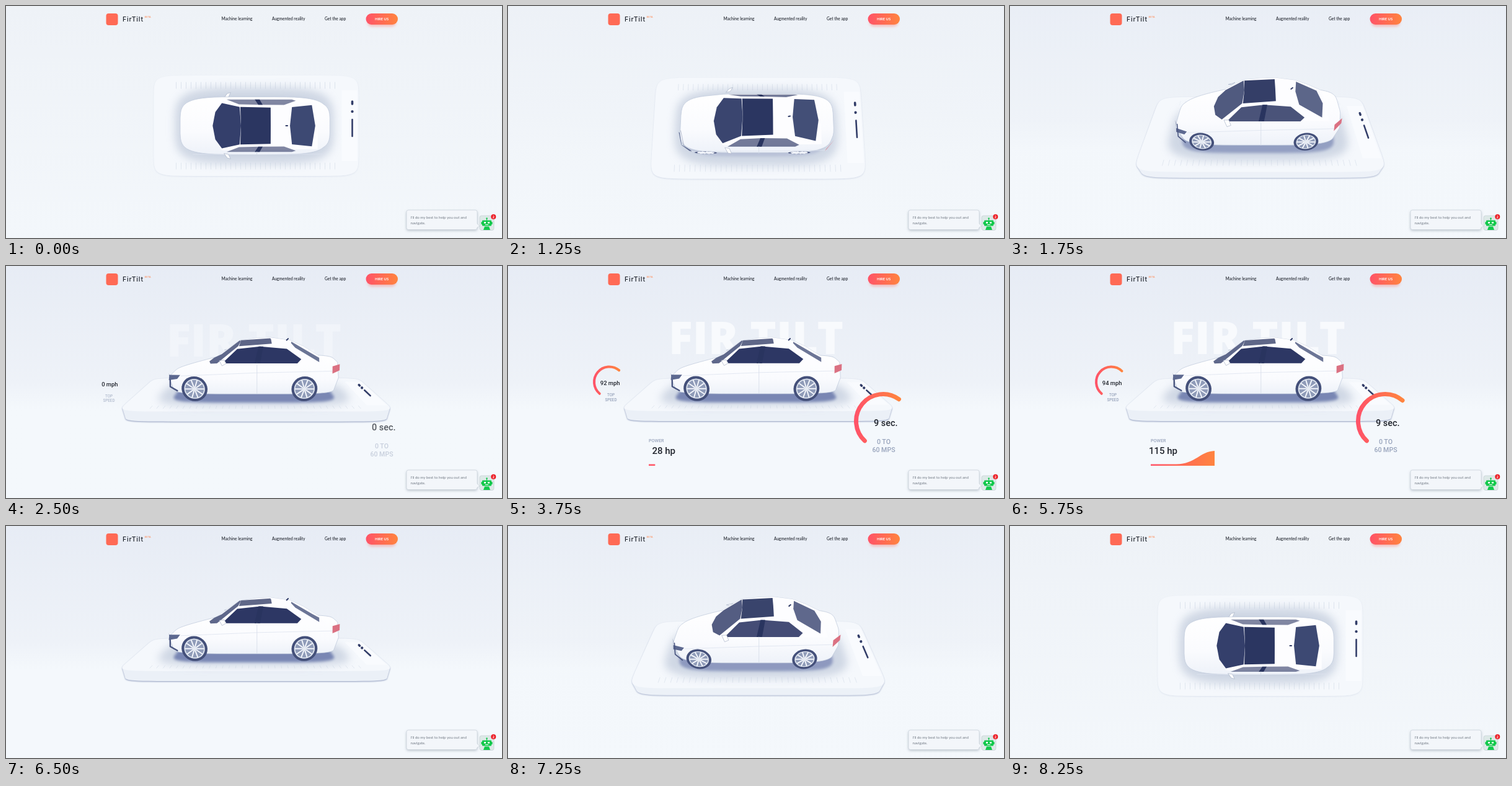
Recreate the animation shown at these times as an HTML page. Size 800 px wide and 374 px high, loop 8500 ms.

```html
<!DOCTYPE html>
<html lang="en">
<head>
<meta charset="utf-8">
<title>FirTilt</title>
<style>
  html, body { margin: 0; height: 100%; overflow: hidden; background: #f2f6fa; }
  svg { display: block; width: 100vw; height: 100vh; }
  text { font-family: Lato, sans-serif; fill: #1c2029; }
  .nav { font-size: 6.6px; font-weight: 500; }
  .chat { font-size: 6.1px; fill: #737b86; }
  .num { font-family: Roboto, sans-serif; font-weight: 500; fill: #20242c; }
  .label { font-family: Roboto, sans-serif; fill: #98a4bc; font-weight: 500; }
  .mid { text-anchor: middle; }
  .end { text-anchor: end; }
</style>
</head>
<body>
<svg viewBox="0 0 800 374">
  <defs>
    <linearGradient id="sky" x2="0" y2="1">
      <stop stop-color="#e7ecf5"/><stop offset=".5" stop-color="#eef2f8"/><stop offset=".62" stop-color="#f4f8fc"/>
    </linearGradient>
    <linearGradient id="floor" x2="0" y2="1">
      <stop stop-color="#eef2f7"/><stop offset="1" stop-color="#f3f7fb"/>
    </linearGradient>
    <linearGradient id="hot"><stop stop-color="#ff5368"/><stop offset="1" stop-color="#ff843f"/></linearGradient>
    <linearGradient id="paint" x2="0" y2="1">
      <stop stop-color="#fff"/><stop offset=".6" stop-color="#fafbfe"/><stop offset="1" stop-color="#eef2f9"/>
    </linearGradient>
    <filter id="soft" x="-30%" y="-60%" width="160%" height="220%"><feGaussianBlur stdDeviation="7"/></filter>
    <filter id="haze" x="-20%" y="-50%" width="140%" height="200%"><feGaussianBlur stdDeviation="2"/></filter>
    <clipPath id="grow"><rect id="bar" x="227" y="290" width="0" height="40"/></clipPath>
  </defs>

  <rect width="800" height="374" fill="url(#floor)"/>
  <rect id="side" width="800" height="374" fill="url(#sky)"/>
  <text id="title" class="mid" x="400" y="142" style="font:800 72px 'Open Sans',sans-serif;fill:#f8fafd">FIR TILT</text>

  <g id="scene" stroke-linejoin="round" stroke-linecap="round"></g>

  <g id="speed">
    <path id="arcA" fill="none" stroke="url(#hot)" stroke-width="4" stroke-linecap="round"/>
    <text id="mph" class="num end" x="180.5" y="192" font-size="9.4"></text>
    <g class="mid" id="speedLabel" font-size="6.3"><text class="label" x="166" y="210">TOP</text><text class="label" x="166" y="217.5">SPEED</text></g>
  </g>
  <g id="sprint">
    <path id="arcB" fill="none" stroke="url(#hot)" stroke-width="7" stroke-linecap="round"/>
    <text id="sec" class="num end" x="628.5" y="258" font-size="14.4"></text>
    <g class="mid" id="sprintLabel" font-size="10.6"><text class="label" x="606" y="287">0 TO</text><text class="label" x="606" y="300">60 MPS</text></g>
  </g>
  <g id="power">
    <text class="label" x="227" y="283.5" font-size="7.2">POWER</text>
    <text id="hp" class="num end" x="270" y="303" font-size="15"></text>
    <path clip-path="url(#grow)" fill="url(#hot)" d="M227 319.5H268C300 319 306 299 330 298V322H227Z"/>
  </g>

  <rect x="161.5" y="12" width="19" height="19" rx="4" fill="#ff6a55"/>
  <text x="188" y="24.5" style="font:500 10.5px Inter,sans-serif;letter-spacing:.8px">FirTilt</text>
  <text x="223.5" y="19" font-size="4.2" style="fill:#ff8a55">BETA</text>
  <text class="nav" x="347.5" y="23">Machine learning</text>
  <text class="nav" x="429" y="23">Augmented reality</text>
  <text class="nav" x="514" y="23">Get the app</text>
  <rect x="583" y="18" width="46" height="15" rx="7" fill="#ff6a5c" opacity=".4" filter="url(#haze)"/>
  <rect x="580.5" y="12" width="51.5" height="18" rx="9" fill="url(#hot)"/>
  <text class="mid" x="606" y="23" font-size="5.8" font-weight="700" style="fill:#fff">HIRE US</text>

  <rect x="646" y="331" width="114" height="31" rx="3" fill="#8b98a5" opacity=".6" filter="url(#haze)"/>
  <path d="M649 329H757Q760 329 760 332V351L764 355L760 357Q760 360.5 757 360.5H649Q646 360.5 646 357.5V332Q646 329 649 329Z" fill="#f3f6fa" stroke="#c9d1da" stroke-width=".7"/>
  <text class="chat" x="652.5" y="342.5">I'll do my best to help you out and</text>
  <text class="chat" x="652.5" y="352">navigate.</text>
  <rect x="764" y="338" width="23" height="23.5" rx="3" fill="#dce9e7" stroke="#c3cdd3" stroke-width=".7"/>
  <g fill="#12c94c">
    <path d="M775 343h1v4h-1zM766.5 348h2v4h-2zM782.5 348h2v4h-2zM772 355.5h7l2 5.5h-11z"/>
    <circle cx="775.5" cy="342.5" r="1.3"/>
    <rect x="768" y="345.5" width="15" height="9" rx="1"/>
  </g>
  <path d="M771 348h3v2.500h-3zM777 348h3v2.500h-3zM773 352h5v1h-5z" fill="#fff"/>
  <circle cx="786.3" cy="339.7" r="4" fill="#ec1c24"/>
  <text class="mid" x="786.3" y="341.8" font-size="5.8" font-weight="700" style="fill:#fff">2</text>
</svg>

<script>
const $ = id => document.getElementById(id);
const ramp = (t, a, b) => Math.max(0, Math.min(1, (t - a) / (b - a)));
const easeOut = (p, n = 3) => 1 - (1 - p) ** n;
const easeInOut = p => p < .5 ? 4 * p ** 3 : 1 - 4 * (1 - p) ** 3;
const range = (n, f) => Array.from({ length: n }, (_, i) => f(i));

// Space: x runs from nose to tail, y up, z towards the viewer.
const DISTANCE = 500;
let tilt, pitch, zoom;

function aim(k) {
  tilt = k;
  pitch = (90 - 74 * k) * Math.PI / 180;
  zoom = 1 + .15 * k;
}

function project([x, y, z]) {
  const sin = Math.sin(pitch), cos = Math.cos(pitch);
  const scale = zoom * DISTANCE / (DISTANCE - y * sin - z * cos);
  return [403.5 + x * scale, 193 + 10.5 * tilt - (y * cos - z * sin) * scale].map(v => +v.toFixed(2));
}

const cross = (o, a, b) => (a[0] - o[0]) * (b[1] - o[1]) - (a[1] - o[1]) * (b[0] - o[0]);
const flat = (pts, attr, close = 'Z') => `<path d="M${pts.join('L')}${close}" ${attr}/>`;
const poly = (pts, attr) => flat(pts.map(project), attr);
const stroke = (pts, color, width) => flat(pts.map(project), `fill="none" stroke="${color}" stroke-width="${width}"`, '');
const mirror = pts => pts.map(([x, y, z]) => [x, y, -z]).reverse();
const loop = half => [...half, ...mirror(half)];

// Draws a face only when it is turned to the camera.
function face(pts, attr) {
  const p = pts.map(project);
  const area = p.reduce((sum, a, i) => sum + cross([0, 0], a, p[(i + 1) % p.length]), 0);
  return area > 0 ? flat(p, attr) : '';
}
const both = (pts, attr) => face(mirror(pts), attr) + face(pts, attr);

function hull(pts, attr) {
  const p = pts.map(project).sort((a, b) => a[0] - b[0] || a[1] - b[1]);
  const half = list => {
    const out = [];
    for (const q of list) {
      while (out.length > 1 && cross(out.at(-2), out.at(-1), q) <= 0) out.pop();
      out.push(q);
    }
    return out.slice(0, -1);
  };
  return flat([...half(p), ...half(p.reverse())], attr);
}

// Rounded rectangle in plan; higher n gives squarer corners.
function ring(x, a, b, n, height) {
  const bend = v => Math.sign(v) * Math.abs(v) ** (2 / n);
  return range(64, i => {
    const angle = (i + .5) / 32 * Math.PI;
    const px = x + a * bend(Math.cos(angle));
    return [px, typeof height === 'number' ? height : height(px), b * bend(Math.sin(angle))];
  });
}

const fill = (color, alpha = 1) => `fill="${color}" opacity="${alpha}"`;
const hoodLine = x => 46 - .25 * Math.max(0, -x - 45);
const body = [...ring(-3, 108, 42, 4.6, 10), ...ring(-3, 113, 44, 4.6, 27), ...ring(-3, 111, 40, 4.6, hoodLine)];
const cabin = loop([[-64, 43, 0], [-50, 48, 36], [-24, 68, 29], [0, 72, 27], [20, 73, 27], [48, 69, 27], [68, 60, 29], [90, 46, 34]]);
const windshield = loop([[-64, 44, 0], [-60, 45, 20], [-50, 48, 33], [-23, 69, 26], [-21, 71, 0]]);
const sunroof = loop([[-21, 71, 0], [-22, 69, 26], [20, 72, 25], [20, 74, 0]]);
const rearGlass = loop([[47, 69, 0], [50, 67, 26], [81, 49, 30], [86, 49, 0]]);
const sideGlass = [[-43, 49, 38], [-24, 66, 30], [5, 69, 29], [39, 66, 29], [57, 54, 36], [52, 49, 38]];
const pillar = [[3, 69, 29], [9, 69, 29], [5, 49, 38], [-2, 49, 38]];
const wing = [[-46, 53, 40], [-40, 54, 41], [-37, 51, 48], [-42, 48, 47]];
const headlight = [[-117, 31, 14], [-112, 33, 33], [-96, 35, 42], [-100, 30, 42], [-113, 26, 33], [-117, 26, 14]];
const taillight = [[96, 46, 41], [108, 46, 28], [108, 38, 29], [96, 37, 43]];

function phone() {
  const plate = ring(0, 165, 81, 12, 0);
  const bar = (z0, z1, width) => stroke([[155, 0, z0], [155, 0, z1]], '#323d68', width);
  const ticks = (z, alpha) => `<g opacity="${alpha}">` +
    range(33, i => stroke([[8 * i - 129, 0, z - 5], [8 * i - 129, 0, z + 5]], '#dce3ed', 1)).join('') + '</g>';
  const slab = `fill="#ebf0f7" opacity="${.2 + .8 * tilt}" style="filter:drop-shadow(0 1.5px .8px #8f9cbd)"`;
  return hull([...plate, ...ring(0, 163, 80, 12, -13)], slab) +
    poly(plate, fill('#f5f8fc')) + ticks(-65, 1 - tilt) + ticks(65, .8) +
    poly([[138, 0, -57], [163, 0, -57], [163, 0, 57], [138, 0, 57]], fill('#fbfdff', .8)) +
    bar(-39, -35, 3.6) + bar(-23, -22.8, 4.2) + bar(-10, 17, 2.6);
}

function wheel(x) {
  const at = (angle, r) => [x + r * Math.cos(angle), 17 + r * Math.sin(angle), 43];
  const disc = (r, color) => face(range(32, i => at(-i / 16 * Math.PI, r)), fill(color));
  const tire = disc(16.5, '#44507a');
  const spokes = range(10, i => stroke([at(i * Math.PI / 5, 3), at(i * Math.PI / 5, 11.5)], '#f1f4fa', 2)).join('');
  return tire && tire + disc(13.2, '#dfe5ef') + disc(11.8, '#8f9bb8') + spokes + disc(2.6, '#e6ebf3');
}

function car() {
  const chrome = 'fill="#fff" stroke="#a9b4c8" stroke-width=".7"';
  const edge = 'fill="url(#paint)" stroke="#c3cddd" stroke-width=".8"';
  return poly(ring(-3, 128, 62, 4, 0), 'fill="#bfc9da" opacity=".7" filter="url(#soft)"') +
    poly(ring(-3, 108, 47, 5, 0), `fill="#6f7eae" opacity="${.1 + .8 * tilt}" filter="url(#haze)"`) +
    poly(mirror(wing), chrome) +
    hull(cabin, edge) + hull(body, edge) + hull(cabin, 'fill="#fdfdff"') +
    both(sideGlass, fill('#2d3764', .6 + .4 * tilt)) + both(pillar, fill('#29345f')) +
    poly(windshield, fill('#343f6b', 1 - .22 * tilt)) +
    poly(sunroof, fill('#2b3661', 1 - .25 * tilt ** 4)) +
    poly(rearGlass, fill('#3d4973', 1 - .25 * tilt)) +
    stroke([[41, 73, 0], [43, 75, 0]], '#323d68', 2) +
    stroke([[-95, 34, 43], [0, 38, 43], [98, 40, 42]], '#dde4ef', .8) +
    stroke([[1, 49, 38], [1, 28, 44], [1, 11, 43]], '#d3dbe8', .8) +
    both(headlight, fill('#5d6990')) + both(taillight, fill('#db7182')) +
    stroke([[-117, 20, 10], [-112, 17, 32], [-101, 14, 41]], '#4a5680', 2.4 * tilt) +
    poly(wing, chrome) + wheel(-78.5) + wheel(61.5);
}

function arc(id, cx, cy, r, from, to) {
  const at = deg => [cx + r * Math.cos(deg * Math.PI / 180), cy + r * Math.sin(deg * Math.PI / 180)];
  $(id).setAttribute('d', to > from + 1 ? `M${at(from)}A${r} ${r} 0 ${+(to - from > 180)} 1 ${at(to)}` : '');
}

function gauges(t) {
  const out = 1 - ramp(t, 6000, 6500);
  const show = (id, a, b) => $(id).setAttribute('opacity', ramp(t, a, b) * out);
  const shift = (id, y) => $(id).setAttribute('transform', `translate(0 ${y})`);
  show('title', 2100, 2850);
  show('speed', 2000, 2400);
  show('speedLabel', 2050, 2700);
  show('sprint', 2050, 2650);
  show('sprintLabel', 2050, 2750);
  show('power', 2850, 3350);

  const rise = 1 - easeOut(ramp(t, 2250, 3250), 2);
  shift('title', 7 * rise);
  shift('speed', 3 * rise);
  shift('sprint', 12 * rise);

  const grown = easeOut(ramp(t, 2500, 4250));
  $('mph').textContent = Math.round(94 * grown) + ' mph';
  $('sec').textContent = Math.round(9 * grown) + ' sec.';
  arc('arcA', 163.5, 187, 24.5, 130, 130 + 184 * grown);
  arc('arcB', 605, 250, 43.5, 133, 133 + 177 * grown);

  const p = ramp(t, 3550, 5550);
  $('hp').textContent = Math.round(115 * easeOut(p, 2.65)) + ' hp';
  $('bar').setAttribute('width', 103 * p);
}

function draw(t) {
  aim(easeInOut(ramp(t, 500, 2750)) - easeInOut(ramp(t, 6525, 8300)));
  $('scene').innerHTML = phone() + car();
  $('side').setAttribute('opacity', tilt);
  gauges(t);
}

// The picture advances four times a second.
const start = performance.now();
let shown = -1;
function tick() {
  const t = Math.floor((performance.now() - start) % 8500 / 250) * 250;
  if (t !== shown) draw(shown = t);
  requestAnimationFrame(tick);
}
tick();
</script>
</body>
</html>
```
